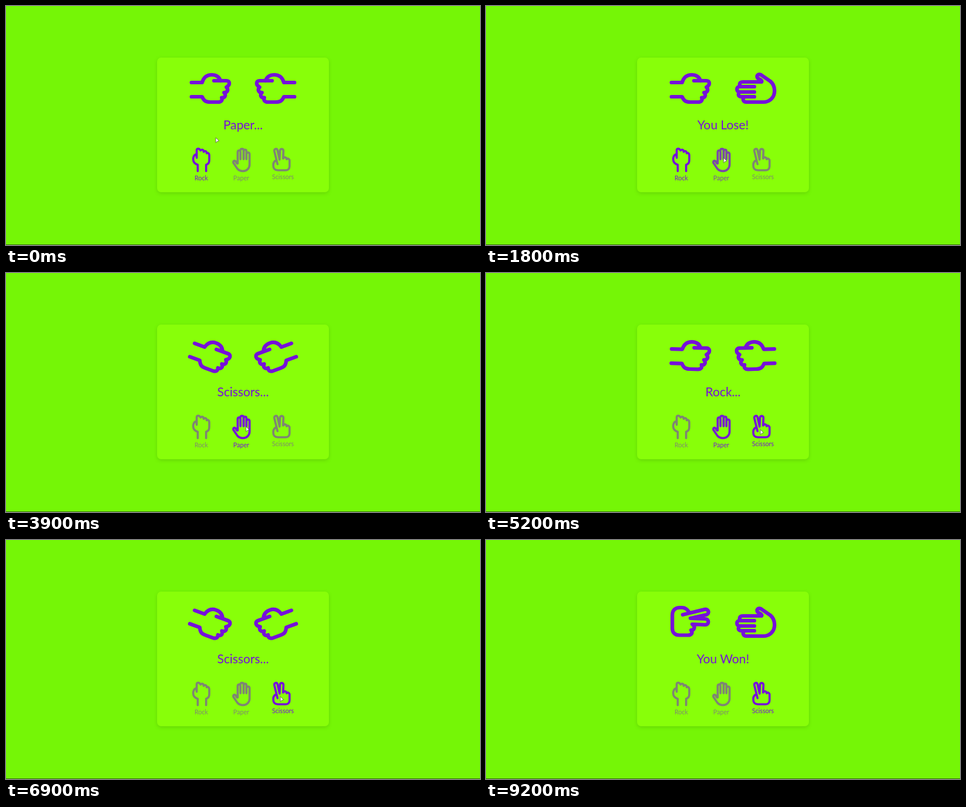
An HTML page that plays this animation: 800 px wide and 403 px high, repeating every 9.3 s.

```html
<!DOCTYPE html>
<html lang="en">
<head>
<meta charset="utf-8">
<title>Rock Paper Scissors</title>
<style>
  html, body { margin: 0; width: 100%; height: 100%; overflow: hidden; background: #75f606; }
  svg { display: block; width: 100%; height: 100%; }
  text { font: 10.6px Lato, sans-serif; text-anchor: middle; fill: #7610da; }
  #message { font-size: 20.8px; }
  .hand { fill: none; stroke: #7610da; stroke-width: 6.2; stroke-linecap: round; stroke-linejoin: round; }
  .card { fill: #88ff09; filter: drop-shadow(0 2px 3px rgba(0, 0, 0, .12)); }
</style>
</head>
<body>
<svg viewBox="0 0 800 403">
  <defs>
    <path id="rock" d="M313 129H331C334 119 340 116 347 116C355 116 360 120 362 126M351 126H372C378 126 379 133 372 137C376 141 374 146 368 146C372 150 370 155 364 154.500C366 159 363 162 358 162H345C337 162 334 160 331 153H313"/>
    <path id="paper" d="M347 136H367C373.700 136 373.700 128 367 128H335C334 127 335 126 336 125L341 122C345 118 341 114 336 116L320 127C314 132 313 139 313 143C313 155 322 162 332 162H361C367.700 162 367.700 153 361 153M347 153H369.500C375.500 153 375.500 145 369.500 145M347 145H372C378 145 378 136 372 136"/>
    <path id="scissors" d="M332 126L369 117C376 116 378 124 372 126L345 132L370 133C377 133 377 143 370 143L348 142C354 146 352 152 346 152C350 157 346 160.500 341 160.500H326C318 160.500 314.500 155 314.500 149V127C314.500 118 320 114 327 114H331C337 114 340 117 343 122"/>
  </defs>
  <rect class="card" x="255" y="87" width="290" height="227" rx="7"/>
  <path d="M0 402.500H800" stroke="#356d10"/>
  <use id="user" class="hand"/>
  <g transform="translate(800) scale(-1 1)"><use id="cpu" class="hand"/></g>
  <text id="message" x="400" y="207.500"></text>
  <g id="options"></g>
  <path id="cursor" d="M0 0V8.500L2.200 6.500L5.500 5.300Z" fill="#fff" stroke="#555" stroke-width=".8" stroke-linejoin="round"/>
</svg>
<script>
const LOOP = 9300, STEP = 100, SHAKE = 700;
const $ = id => document.getElementById(id);

const rounds = [
  { start: -1385, user: 'rock', cpu: 'paper', result: 'You Lose!' },
  { start: 2150, user: 'paper', cpu: 'scissors', result: 'You Lose!' },
  { start: 5170, user: 'scissors', cpu: 'paper', result: 'You Won!' }
];
const calls = ['Rock...', 'Paper...', 'Scissors...'];

// Each option is lit between the times on and off.
const options = [
  { name: 'rock', x: 329.5, y: 259.5, textX: 329.5, textY: 294, on: -1000, off: 2150 },
  { name: 'paper', x: 397.5, y: 259.5, textX: 397, textY: 294, on: 1710, off: 5170 },
  { name: 'scissors', x: 465.9, y: 259, textX: 467.5, textY: 292, on: 4650, off: LOOP }
];

// Cursor stops: time, x, y
const stops = [
  [1300, 354, 222], [1800, 401, 256], [2050, 405, 259],
  [4400, 405, 259], [4900, 463, 264],
  [8250, 463, 264], [8750, 440, -12]
];

$('options').innerHTML = options.map(o => `<g>
  <use href="#${o.name}" class="hand" transform="translate(${o.x} ${o.y}) rotate(-90) scale(.59) translate(-345 -139)"/>
  <text x="${o.textX}" y="${o.textY}">${o.name[0].toUpperCase() + o.name.slice(1)}</text></g>`).join('');

const clamp = v => Math.min(1, Math.max(0, v));

// The CSS "ease" curve, cubic-bezier(.25, .1, .25, 1)
function ease(x) {
  const curve = (a, b, s) => 3 * a * s * (1 - s) ** 2 + 3 * b * s * s * (1 - s) + s ** 3;
  let low = 0, high = 1;
  for (let i = 0; i < 20; i++) {
    const mid = (low + high) / 2;
    if (curve(.25, .25, mid) < x) low = mid; else high = mid;
  }
  return curve(.1, 1, low);
}

function shakeAngle(age) {
  const half = age % SHAKE / SHAKE * 2;
  return 20 * (half < 1 ? ease(half) : 1 - ease(half - 1));
}

function cursorAt(t) {
  const i = stops.findIndex(s => s[0] > t);
  if (i < 0) return stops[stops.length - 1].slice(1);
  if (i === 0) return stops[0].slice(1);
  const [t0, x0, y0] = stops[i - 1], [t1, x1, y1] = stops[i];
  const p = (t - t0) / (t1 - t0), s = p * p * (3 - 2 * p);
  return [x0 + (x1 - x0) * s, y0 + (y1 - y0) * s];
}

function draw(t) {
  const round = rounds.filter(r => r.start <= t).pop();
  const age = t - round.start;
  const playing = age < SHAKE * calls.length;
  const angle = playing ? shakeAngle(age) : 0;
  for (const side of ['user', 'cpu']) {
    $(side).setAttribute('href', '#' + (playing ? 'rock' : round[side]));
    $(side).setAttribute('transform', `rotate(${angle} 345 139)`);
  }
  $('message').textContent = playing ? calls[Math.floor(age / SHAKE)] : round.result;
  options.forEach((o, i) => {
    const lit = ease(clamp((t - o.on) / 300)) - ease(clamp((t - o.off) / 300));
    $('options').children[i].setAttribute('opacity', .5 + .5 * lit);
  });
  $('cursor').setAttribute('transform', `translate(${cursorAt(t)})`);
}

const begin = performance.now();
function tick() {
  const t = (performance.now() - begin) % LOOP;
  draw(Math.floor(t / STEP) * STEP);
  requestAnimationFrame(tick);
}
tick();
</script>
</body>
</html>
```
